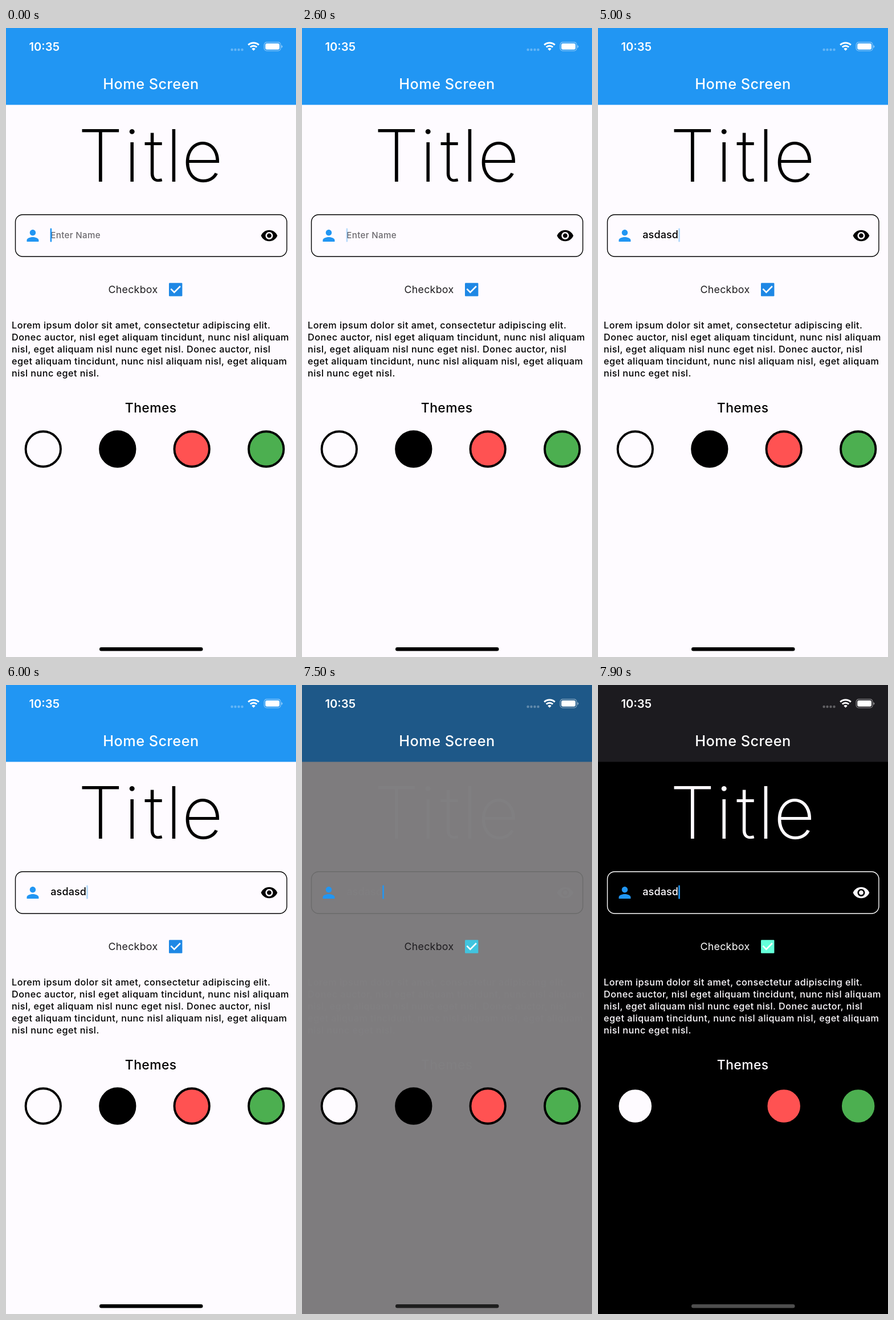
An HTML page that plays this animation: 509 by 1101 pixels, repeating every 8000 ms.

```html
<!DOCTYPE html>
<html lang="en">
<head>
<meta charset="utf-8">
<style>
html, body { margin: 0; width: 100%; height: 100%; overflow: hidden; background: #fefbff; }
svg { display: block; width: 509px; height: 1101px; font-family: Inter, "Open Sans", sans-serif; }
text { white-space: pre; }
</style>
</head>
<body>
<svg viewBox="0 0 509 1101">
  <rect id="page" width="509" height="1101"/>
  <rect id="bar" width="509" height="134.5"/>

  <g fill="#fff">
    <text x="40.5" y="40" font-size="20.2" font-weight="600">10:35</text>
    <g opacity=".3">
      <circle cx="396.6" cy="38" r="2.2"/><circle cx="402.5" cy="38" r="2.2"/>
      <circle cx="408.5" cy="38" r="2.2"/><circle cx="414.5" cy="38" r="2.2"/>
    </g>
    <g fill="none" stroke="#fff" stroke-width="3">
      <path d="M425.2 29.7a13.6 13.6 0 0 1 18.6 0M428.8 33.5a8.4 8.4 0 0 1 11.4 0"/>
    </g>
    <path d="M434.5 39.8l-3.2-3.4a4.6 4.6 0 0 1 6.4 0z"/>
    <rect x="453.2" y="25" width="28.8" height="14.8" rx="4.4" fill="none" stroke="#fff" stroke-width="1.3" opacity=".45"/>
    <rect x="455.2" y="27" width="24.8" height="10.8" rx="2.7"/>
    <path d="M483.4 30v5q2-.7 2-2.5t-2-2.5z" opacity=".5"/>
    <text x="254.5" y="106.8" font-size="25.3" font-weight="500" letter-spacing=".45" text-anchor="middle">Home Screen</text>
  </g>

  <g id="ink">
    <text x="126.2" y="269" dx="0 -2 4 0 -4" font-size="126.5" font-weight="160" letter-spacing="3.5" style="font-kerning:none">Title</text>
    <path transform="translate(446.3 347.8) scale(1.305)" d="M12 4.5C7 4.5 2.73 7.61 1 12c1.73 4.39 6 7.5 11 7.5s9.27-3.11 11-7.5c-1.73-4.39-6-7.5-11-7.5zM12 17c-2.76 0-5-2.24-5-5s2.24-5 5-5 5 2.24 5 5-2.24 5-5 5zm0-8c-1.66 0-3 1.34-3 3s1.34 3 3 3 3-1.34 3-3-1.34-3-3-3z"/>
    <g font-size="16.2" font-weight="500" letter-spacing=".48">
      <text x="10" y="526">Lorem ipsum dolor sit amet, consectetur adipiscing elit.</text>
      <text x="10" y="546.9">Donec auctor, nisl eget aliquam tincidunt, nunc nisl aliquam</text>
      <text x="10" y="567.8">nisl, eget aliquam nisl nunc eget nisl. Donec auctor, nisl</text>
      <text x="10" y="588.6">eget aliquam tincidunt, nunc nisl aliquam nisl, eget aliquam</text>
      <text x="10" y="609.5">nisl nunc eget nisl.</text>
    </g>
    <text x="254.2" y="673.3" font-size="22.9" font-weight="500" letter-spacing=".4" text-anchor="middle">Themes</text>
    <text id="typed" x="78.3" y="368" font-size="18" font-weight="500" letter-spacing=".1"></text>
  </g>

  <rect id="field" x="16.5" y="326.8" width="476.4" height="73.2" rx="12.8" fill="none" stroke-width="1.4"/>
  <path fill="#2196f3" transform="translate(31.3 347.8) scale(1.305)" d="M12 12c2.21 0 4-1.79 4-4s-1.79-4-4-4-4 1.79-4 4 1.79 4 4 4zm0 2c-2.67 0-8 1.34-8 4v2h16v-2c0-2.66-5.33-4-8-4z"/>
  <text id="hint" x="78.3" y="368" font-size="15.1" font-weight="500" letter-spacing=".35" fill="#6b696d">Enter Name</text>
  <rect id="caret" y="350.6" width="2.6" height="23.8" rx="1.2" fill="#2196f3"/>

  <text id="label" x="179.4" y="464" font-size="17.8" letter-spacing=".3">Checkbox</text>
  <rect id="box" x="286" y="446.2" width="23.4" height="23.4" rx="1.3"/>
  <path d="M289.4 456.7l5.9 5.9 10.6-10.6" fill="none" stroke="#fff" stroke-width="2.6"/>

  <g stroke="#000" stroke-width="3.9">
    <circle cx="65.3" cy="737" r="30.7" fill="#fefbff"/>
    <circle cx="195.8" cy="737" r="30.7"/>
    <circle cx="326.2" cy="737" r="30.7" fill="#ff5252"/>
    <circle cx="456.7" cy="737" r="30.7" fill="#4caf50"/>
  </g>
  <rect id="home" x="164" y="1084" width="181.5" height="6.5" rx="3.25"/>
</svg>
<script>
const LOOP = 8000, SWITCH = 7400;
const WORD = "asdasd";
const KEYS = [3550, 3700, 3850, 4050, 4250, 4405];  // key presses, ms
const CARETS = [77.6, 88, 98, 109.2, 119.9, 130.1, 141.2];

const el = id => document.getElementById(id);
const clamp = v => Math.min(1, Math.max(0, v));
const ramp = (t, from, to) => clamp((t - from) / (to - from));
const fill = (id, color) => el(id).setAttribute("fill", color);

function mix(a, b, p) {
  return "rgb(" + a.map((v, i) => Math.round(v + (b[i] - v) * p)) + ")";
}

// Solid half a second, fades out, rests, fades in
function blink(ms) {
  const p = (ms % 1000) / 1000;
  return p < 0.65 ? 1 - ramp(p, 0.5, 0.65) : ramp(p, 0.85, 1);
}

const BLACK = [0, 0, 0], WHITE = [255, 255, 255], PAPER = [254, 251, 255];

function draw(t) {
  const count = KEYS.filter(k => t >= k).length;
  const theme = ramp(t, SWITCH, SWITCH + 200);

  fill("page", mix(PAPER, BLACK, theme));
  fill("bar", mix([33, 150, 243], [28, 27, 31], theme));
  fill("ink", mix(BLACK, PAPER, theme));
  fill("box", mix([30, 136, 229], [100, 255, 218], theme));
  fill("label", mix([29, 27, 30], WHITE, ramp(t, SWITCH + 100, SWITCH + 300)));
  fill("home", mix(BLACK, [78, 78, 78], ramp(t, SWITCH, SWITCH + 260)));
  el("field").setAttribute("stroke", mix(BLACK, WHITE, ramp(t, SWITCH, SWITCH + 240)));

  el("typed").textContent = WORD.slice(0, count);
  el("hint").setAttribute("visibility", count ? "hidden" : "visible");
  el("caret").setAttribute("x", CARETS[count]);
  el("caret").setAttribute("opacity", blink(count ? t - KEYS[count - 1] : t));
}

const start = performance.now();
function tick() {
  draw((performance.now() - start) % LOOP);
  requestAnimationFrame(tick);
}
draw(0);
requestAnimationFrame(tick);
</script>
</body>
</html>
```
